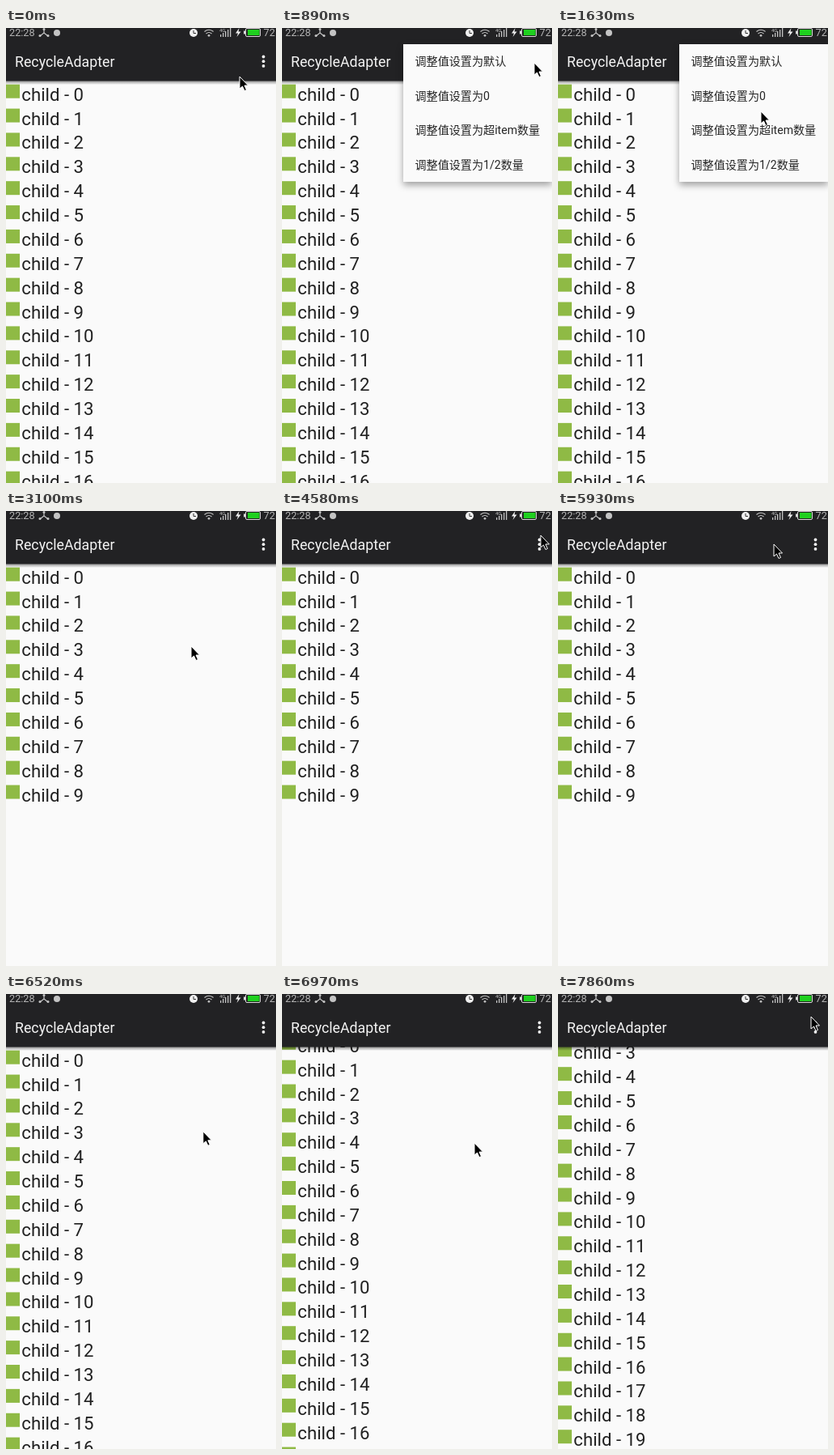
An HTML page for the animation above (8000 ms loop, 334 by 562 pixels).

```html
<!DOCTYPE html>
<html lang="zh">
<head>
<meta charset="utf-8">
<title>RecycleAdapter</title>
<style>
  html, body { margin: 0; width: 100%; height: 100%; overflow: hidden; background: #fafafa; }
  svg { display: block; width: 100vw; height: 100vh; }
  text { font-family: Roboto, "Noto Sans CJK SC", "Noto Sans CJK", sans-serif; white-space: pre; }
  #list { font-size: 22.2px; fill: #212121; }
  #list rect { fill: #8fba45; }
  #menu { transform-origin: 334px 20px; }
  #menu text { font-size: 14.1px; fill: #262626; }
  #panel { fill: #fafafa; filter: drop-shadow(0 4px 4px rgba(0, 0, 0, .36)); }
  #title { font-size: 17.75px; fill: #f4f4f4; }
  #dots { fill: #f2f2f2; }
  .status { font-size: 12.7px; fill: #b4b4b4; }
  .line { fill: none; stroke: #c4c4c4; stroke-width: 1.2; }
  .soft { fill: #c4c4c4; }
</style>
</head>
<body>
<svg viewBox="0 0 334 562">
  <defs>
    <linearGradient id="shade" x2="0" y2="1">
      <stop stop-color="#000" stop-opacity=".45"/>
      <stop offset="1" stop-color="#000" stop-opacity="0"/>
    </linearGradient>
  </defs>
  <rect width="334" height="562" fill="#fafafa"/>
  <g id="list"></g>

  <rect y="65" width="334" height="5" fill="url(#shade)"/>
  <rect width="334" height="65.5" fill="#222224"/>
  <text id="title" x="11" y="48">RecycleAdapter</text>
  <g id="dots"></g>

  <text class="status" x="4" y="10">22:28</text>
  <path class="line" d="M47 1V6L42 10M47 6L52 10"/>
  <g class="soft">
    <circle cx="47" cy="1.5" r="1.5"/>
    <circle cx="42" cy="9.5" r="1.5"/>
    <circle cx="52" cy="9.5" r="1.5"/>
    <circle cx="63" cy="6" r="4"/>
  </g>
  <circle cx="232" cy="6" r="5" fill="#f0f0f0"/>
  <path d="M232 3V6.5H235M227 2L229 0M237 2L235 0" fill="none" stroke="#333"/>
  <path class="line" d="M245.5 4.5Q251 0 256.500 4.5M247.5 7Q251 4 254.500 7"/>
  <circle class="soft" cx="251" cy="9.3" r="1.4"/>
  <text class="soft" x="264" y="5" font-size="6">4G</text>
  <g id="bars" class="soft"></g>
  <path d="M288.5 0L284 6.5H287L285.5 11L290.5 4.5H287.5Z" fill="#f0f0f0"/>
  <rect x="296.5" y=".5" width="18" height="10" rx="1.5" fill="#222" stroke="#d8d8d8"/>
  <rect x="294" y="3.5" width="2" height="4" fill="#d8d8d8"/>
  <rect x="299" y="2" width="14.5" height="7" fill="#1fd01f"/>
  <text class="status" x="318.5" y="10">72</text>

  <g id="menu"><rect id="panel" x="150" y="20" width="184" height="170"/></g>
  <path id="cursor" d="M0 0V15L3.500 12L6 17.500L8.500 16.500L6 11H10.500Z" fill="#000" stroke="#fff"/>
</svg>
<script>
const LOOP = 8000, TICK = 148.1, LAST = 53;
const ROWS = 20, HALF = 10, PITCH = 29.87, OVERFLOW = 99;
const $ = id => document.getElementById(id);
const times = (n, fn) => Array.from({ length: n }, (_, i) => fn(i));

function add(parent, tag, attrs, text = '') {
  const el = document.createElementNS('http://www.w3.org/2000/svg', tag);
  for (const name in attrs) el.setAttribute(name, attrs[name]);
  el.textContent = text;
  return parent.appendChild(el);
}

const rows = times(ROWS, i => {
  const row = add($('list'), 'g', { transform: `translate(0 ${66.7 + i * PITCH})` });
  add(row, 'rect', { y: 3, width: 17, height: 17 });
  add(row, 'text', { x: 19.3, y: 23 }, `child - ${i}`);
  return row;
});
times(3, i => add($('dots'), 'circle', { cx: 318.5, cy: 35.5 + i * 5.7, r: 1.9 }));
times(5, i => add($('bars'), 'rect', { x: 265 + i * 3, y: 8 - i * 2, width: 1.3, height: 3 + i * 2 }));
['默认', '0', '超item数量', '1/2数量'].forEach((label, i) =>
  add($('menu'), 'text', { x: 164.5, y: 46 + i * 42.6 }, '调整值设置为' + label));

// Pointer strokes: glide to (x, y) between two ticks.
const origin = { x: 289, y: 60 };
const strokes = [
  { from: 0, to: 2, x: 312, y: 43 },
  { from: 7, to: 11, x: 251, y: 103 },
  { from: 11, to: 16, x: 229, y: 167 },
  { from: 22, to: 28, x: 320, y: 30 },
  { from: 32, to: 36, x: 267, y: 41 },
  { from: 40, to: 45, x: 238, y: 202 },
  { from: 50, to: 53, x: 313, y: 127 }
];

// 0 before `from`, 1 after `to`, linear between.
const ramp = (t, from, to) => Math.min(1, Math.max(0, (t - from) / (to - from)));
const pulse = (t, open, close) => ramp(t, open, open + 2) - ramp(t, close, close + 2);

function glide(t) {
  return strokes.reduce((p, s) => {
    const k = ramp(t, s.from, s.to);
    return { x: p.x + (s.x - p.x) * k, y: p.y + (s.y - p.y) * k };
  }, origin);
}

function draw(now) {
  const t = Math.min(LAST, Math.floor((now % LOOP + 14) / TICK));
  const scroll = OVERFLOW * ramp(t, 45, 49.7) ** 2;
  const shown = pulse(t, 4, 16) + pulse(t, 31, 38);
  const extra = 1 - ramp(t, 18, 20) + ramp(t, 40, 43);
  const { x, y } = glide(t);
  // The pointer drags the list, so both move up together.
  $('cursor').setAttribute('transform', `translate(${x} ${y - scroll})`);
  $('list').setAttribute('transform', `translate(0 ${-scroll})`);
  $('menu').style.opacity = shown;
  $('menu').style.transform = `scale(${0.85 + 0.15 * shown})`;
  rows.slice(HALF).forEach(row => row.style.opacity = extra);
}

const start = performance.now();
function loop() {
  draw(performance.now() - start);
  requestAnimationFrame(loop);
}
loop();
</script>
</body>
</html>
```
